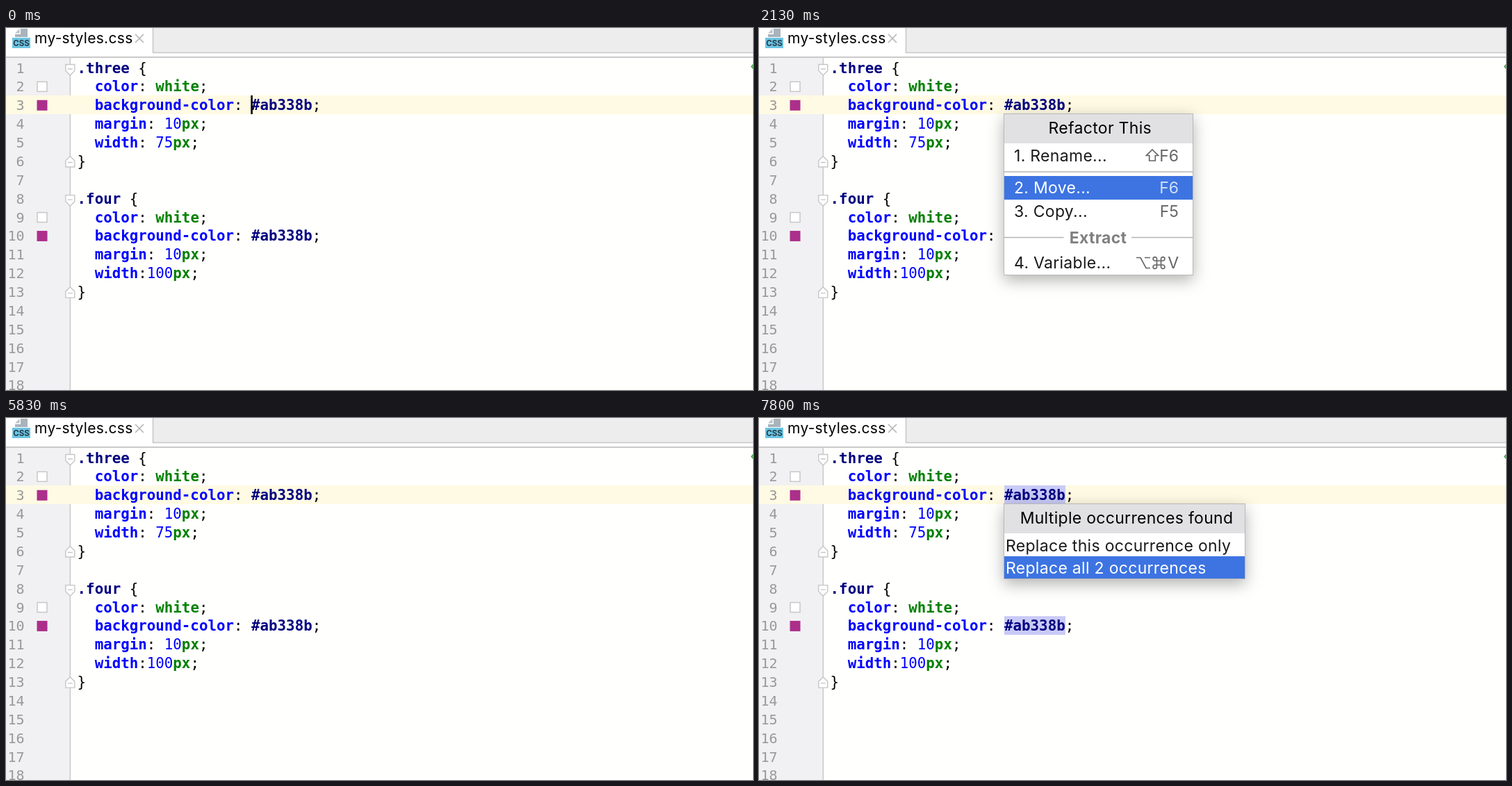
These frames come from a looping animation (1075 by 521 pixels, 8000 ms). An HTML page:

```html
<!DOCTYPE html>
<html lang="en">
<head>
<meta charset="utf-8">
<title>Extract a variable</title>
<style>
  html, body { margin: 0; width: 100%; height: 100%; overflow: hidden; background: #fffffd; }
  svg { display: block; width: 1075px; height: 521px; }
  .code { font: 20.8px "DejaVu Sans Mono", monospace; white-space: pre; }
  .num { font: 20px "DejaVu Sans Mono", monospace; fill: #999; text-anchor: end; }
  .sel, .hex { fill: #000080; font-weight: bold; }
  .prop { fill: #0000ff; font-weight: bold; }
  .word { fill: #008000; font-weight: bold; }
  .val { fill: #0000ff; }
  .ui { font: 23px Inter, sans-serif; letter-spacing: .3px; fill: #1a1a1a; }
  .tab { font-size: 21px; fill: #000; }
  .mid { text-anchor: middle; fill: #000; }
  .head { font-weight: bold; fill: #808080; }
  .panel { filter: drop-shadow(0 7px 11px rgba(0, 0, 0, .3)); }
  .bar { fill: none; }
  .key { fill: #666; text-anchor: end; letter-spacing: 0; }
  .glyph { fill: none; stroke: #666; stroke-width: 1.7; }
  .on .bar { fill: #3d74e2; }
  .on .ui { fill: #fff; }
  .on .key { fill: #d3dff8; }
  .on .glyph { stroke: #d3dff8; }
</style>
</head>
<body>
<svg id="stage" viewBox="0 0 1075 521"></svg>
<script>
const LOOP = 8000;
const PITCH = 26.88;
const LEFT = 102.6;

// [start, caret, open popup, chosen row, highlighted colours]
const STEPS = [
  [0, true, "", 0, 0],
  [360, false, "", 0, 0],
  [860, true, "", 0, 0],
  [960, false, "menu", 0, 0],
  [2130, false, "menu", 1, 0],
  [3230, false, "menu", 2, 0],
  [4100, false, "menu", 3, 0],
  [5830, false, "", 0, 0],
  [5860, false, "", 0, 1],
  [5900, false, "choice", 0, 1],
  [7800, false, "choice", 1, 2]
];

const LINES = [
  ".three {", "  color: white;", "  background-color: #ab338b;", "  margin: 10px;", "  width: 75px;", "}", "",
  ".four {", "  color: white;", "  background-color: #ab338b;", "  margin: 10px;", "  width:100px;", "}"
];

const rect = (x, y, w, h, fill, extra = "") =>
  `<rect x="${x}" y="${y}" width="${w}" height="${h}" fill="${fill}" ${extra}/>`;
const path = (d, attrs) => `<path d="${d}" ${attrs}/>`;
const text = (x, y, cls, s) => `<text x="${x}" y="${y}" class="${cls}">${s}</text>`;
const span = (cls, s) => `<tspan class="${cls}">${s}</tspan>`;
const rowTop = n => 43.3 + PITCH * n;
const baseline = n => 64.5 + PITCH * n;

function colour(line) {
  if (line[0] === ".") return span("sel", line.slice(0, -2)) + " {";
  const parts = line.match(/^( +)([\w-]+)(: ?)(.+);$/);
  if (!parts) return line;
  const [, indent, prop, colon, value] = parts;
  const shown = value[0] === "#" ? span("hex", value)
    : value.endsWith("px") ? span("val", parseInt(value)) + span("word", "px")
    : span("word", value);
  return indent + span("prop", prop) + colon + shown + ";";
}

function tabs() {
  return rect(0, 0, 1075, 42, "#fff") +
    rect(212, 0, 863, 35, "#ededed") +
    path("M211.5 0V35.5H1075", 'fill="none" stroke="#c6c6c6" stroke-width="1.5"') +
    rect(0, 41, 1075, 2, "#c9c9c9") +
    path("M21 1H31V13H13V9H21Z", 'fill="#a9b3bb"') +
    path("M13 7.5L19.5 1V7.5Z", 'fill="#bcc4ca"') +
    rect(9, 14, 26, 15, "#6cc5e3") +
    '<text x="22" y="26" text-anchor="middle" font-family="Inter, sans-serif" font-size="11.5" font-weight="700" fill="#283c48">CSS</text>' +
    text(41, 22, "ui tab", "my-styles.css") +
    path("M186 9L198 21M198 9L186 21", 'stroke="#b5b5b5" stroke-width="1.6"');
}

function fold(n, up) {
  const y = up ? 200 + PITCH * (n - 5) : 52.5 + PITCH * n;
  return `<g transform="translate(92.3 ${y}) scale(1 ${up ? -1 : 1})" fill="#fff" stroke="#c6c6c6" stroke-width="1.4">` +
    path("M-6.5 0H6.5V9L0 15.5L-6.5 9ZM-3.5 6.5H3.5", "") + "</g>";
}

function editor() {
  let out = rect(0, 43, 92, 478, "#f1f1f3") + rect(91.6, 43, 1.5, 478, "#c9c9c9") +
    rect(0, 97, 1075, 27, "#fffae3");
  for (const n of [0, 7]) out += fold(n, false) + fold(n + 5 + (n ? 0 : 0), true);
  for (const n of [1, 8]) {
    const y = rowTop(n) + 7.2;
    out += rect(45, y, 14, 14, "#fff", 'stroke="#c4c4c4" stroke-width="1.4"') +
      rect(44.5, y + PITCH - .5, 15, 15, "#ab2f8b");
  }
  for (let n = 0; n < 18; n++) out += text(26.5, baseline(n), "num", n + 1);
  [2, 9].forEach((n, i) => out += rect(353, rowTop(n), 88, 26.9, "#c9caf6", `id="mark${i}"`));
  LINES.forEach((line, n) => out += text(LEFT, baseline(n), "code", colour(line)));
  return out + rect(352.3, 97, 2.6, 27, "#000", 'id="caret"') +
    path("M1076 52L1073 55.5L1076 59", 'fill="none" stroke="#4caf50" stroke-width="2"');
}

const row = (x, width, top, height, base, label, keys = "") =>
  `<g class="row">${rect(353, top, width, height, "none", 'class="bar"')}${text(x, base, "ui", label)}${keys}</g>`;
const shortcut = (y, s) => text(604, y, "ui key", s);
const glyph = (x, y, d) => path(d, `class="glyph" transform="translate(${x} ${y})"`);
const SHIFT = "M0-8.5L8.5 0H4.3V7.5H-4.3V0H-8.5Z";
const OPTION = "M-10-7.5H-4L4 7.5H10M2-7.5H10";
const COMMAND = "M-3-3v-2.7a2.7 2.7 0 1 0-2.7 2.7h11.4a2.7 2.7 0 1 0-2.7-2.7v11.4" +
  "a2.7 2.7 0 1 0 2.7-2.7h-11.4a2.7 2.7 0 1 0 2.7 2.7z";

function popup(id, width, height, titleX, title, body) {
  return `<g id="${id}">` +
    rect(352.5, 123.5, width + 1, height + 1, "#fff", 'class="panel" stroke="#b9b9b9"') +
    rect(353, 124, width, 42, "#e1e1e3") +
    text(titleX, 152, "ui mid", title) + body + "</g>";
}

const rule = (x1, x2, y) => path(`M${x1} ${y}H${x2}`, 'stroke="#b4b4b4" stroke-width="1.6"');

document.getElementById("stage").innerHTML = rect(0, 0, 1075, 521, "#fffffd") + tabs() + editor() +
  popup("menu", 271, 231, 490.8, "Refactor This",
    row(367, 271, 167, 33.5, 191.5, "1. Rename...", glyph(566, 183.5, SHIFT) + shortcut(191.5, "F6")) +
    rule(353, 624, 207) +
    row(367, 271, 213, 34, 238, "2. Move...", shortcut(238, "F6")) +
    row(367, 271, 247, 34, 272, "3. Copy...", shortcut(272, "F5")) +
    rule(353, 438.5, 301.5) + rule(536, 624, 301.5) +
    text(488, 309.5, "ui mid head", "Extract") +
    row(367, 271, 320.5, 34, 345.5, "4. Variable...",
      glyph(553, 338, OPTION) + glyph(575.5, 338, COMMAND) + shortcut(345.5, "V"))) +
  popup("choice", 346, 107, 529, "Multiple occurrences found",
    row(355, 346, 167, 32, 191.5, "Replace this occurrence only") +
    row(355, 346, 199, 32, 223.5, "Replace all 2 occurrences"));

const byId = id => document.getElementById(id);
const show = (node, visible) => node.style.display = visible ? "" : "none";

function render(time) {
  const [, caret, open, chosen, marks] = STEPS.findLast(step => step[0] <= time);
  show(byId("caret"), caret);
  for (const id of ["menu", "choice"]) {
    show(byId(id), id === open);
    byId(id).querySelectorAll(".row").forEach((r, i) => r.classList.toggle("on", i === chosen));
  }
  for (const i of [0, 1]) show(byId("mark" + i), i < marks);
}

const start = performance.now();
function tick() {
  render((performance.now() - start) % LOOP);
  requestAnimationFrame(tick);
}
tick();
</script>
</body>
</html>
```
